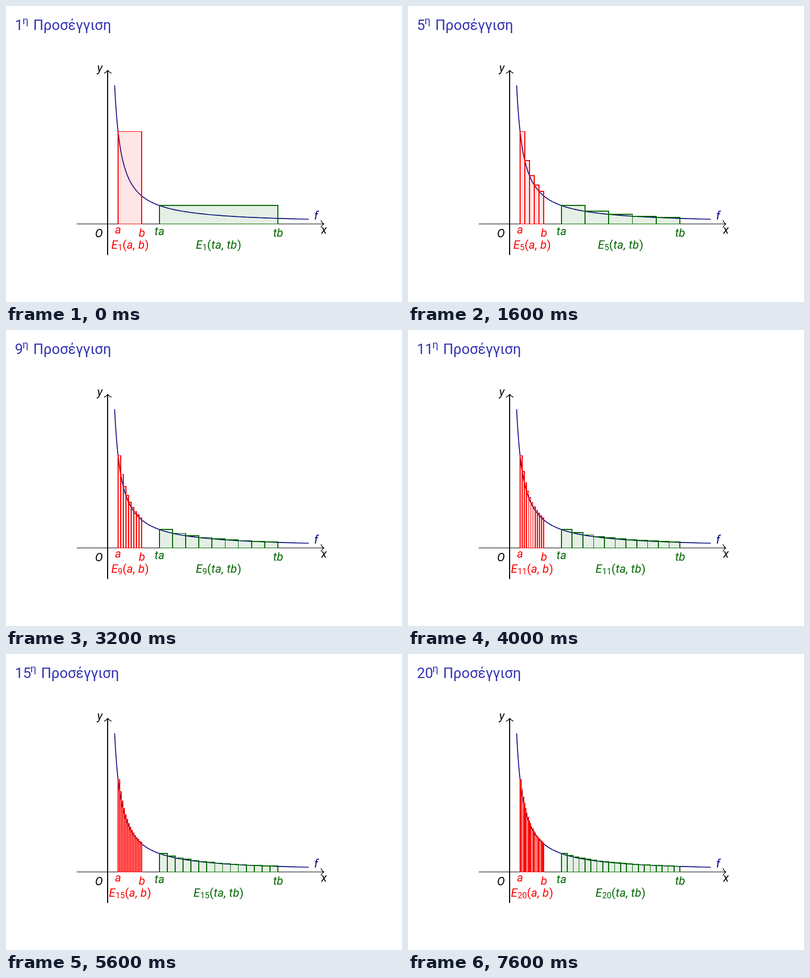
Write an HTML page that moves like this. It is 756x567 px and loops after 8000 ms.

```html
<!DOCTYPE html>
<html lang="el">
<head>
<meta charset="utf-8">
<style>
  html, body { margin: 0; width: 100%; height: 100%; overflow: hidden; background: #fff; }
  svg { display: block; }
  text { font-family: Roboto, "Open Sans", sans-serif; font-weight: 400; }
  .math { font-size: 22.3px; font-style: italic; text-anchor: middle; }
  .area { letter-spacing: .4px; }
  .sub { font-size: 15.8px; font-style: normal; letter-spacing: 0; }
  .up { font-style: normal; }
  .title { font-size: 27.5px; fill: #3333b3; }
  .order { font-size: 20px; }
  .line { fill: none; stroke-width: 1.66; }
  .head { stroke-width: 1.33; stroke-linecap: round; stroke-linejoin: round; }
</style>
</head>
<body>
<svg id="stage" width="756" height="567" viewBox="0 0 756 567"></svg>
<script>
const STEP = 400, COUNT = 20;
const UNIT = 59.06, OX = 194.26, OY = 417.57, HALF = 0.83;
const A = 1 / 3, B = 1.1, T = 5;
const RED = '#ff0000', GREEN = '#006600', NAVY = '#000080', BLACK = '#000';

const stage = document.getElementById('stage');
const px = x => OX + x * UNIT;
const py = y => OY - y * UNIT;

function add(parent, tag, attrs, text) {
  const el = document.createElementNS('http://www.w3.org/2000/svg', tag);
  for (const key in attrs) el.setAttribute(key, attrs[key]);
  if (text) el.textContent = text;
  return parent.appendChild(el);
}

// Lines snap to whole pixels, so they come out one or two pixels wide.
const lo = v => Math.round(v - HALF);
const hi = v => Math.round(v + HALF);
const box = (l, t, r, b) => `M${l} ${t}H${r}V${b}H${l}Z`;
const hLine = (x1, x2, y) => box(lo(x1), lo(y), hi(x2), hi(y));
const vLine = (x, y1, y2) => box(lo(x), lo(y1), hi(x), hi(y2));

function addBars(parent, from, to, n, color) {
  const w = (to - from) / n;
  let fill = '', edges = '';
  for (let i = 0; i < n; i++) {
    const x = from + i * w;
    const l = px(x), r = px(x + w), t = py(1 / x);
    fill += box(Math.round(l), Math.round(t), Math.round(r), Math.round(OY));
    edges += hLine(l, r, t) + hLine(l, r, OY) + vLine(l, t, OY) + vLine(r, t, OY);
  }
  add(parent, 'path', { d: fill, fill: color, 'fill-opacity': 0.1 });
  add(parent, 'path', { d: edges, fill: color });
}

function addArea(parent, n, x, args, color) {
  const text = add(parent, 'text', { x, y: 464.5, fill: color, class: 'math area' });
  add(text, 'tspan', {}, 'E');
  add(text, 'tspan', { dy: 3.5, class: 'sub' }, String(n));
  add(text, 'tspan', { dy: -3.5, class: 'up' }, '(');
  add(text, 'tspan', {}, args[0]);
  add(text, 'tspan', {}, ',');
  add(text, 'tspan', { dx: 5 }, args[1]);
  add(text, 'tspan', { class: 'up' }, ')');
}

function addTitle(parent, n) {
  const shift = 15 * String(n).length;
  add(parent, 'text', { x: 17, y: 46, class: 'title' }, String(n));
  add(parent, 'text', { x: 16.5 + shift, y: 35, class: 'title order' }, 'η');
  add(parent, 'text', { x: 37 + shift, y: 46, class: 'title' }, 'Προσέγγιση');
}

function addLabel(text, x, y, color) {
  add(stage, 'text', { x, y, fill: color, class: 'math' }, text);
}

function addHead(x, y, angle) {
  add(stage, 'path', {
    d: 'M-5.4 -6.6C-5 -4.1 -1.1 -.4 0 0C-1.1 .4 -5 4.1 -5.4 6.6',
    transform: `translate(${x} ${y}) rotate(${angle})`, stroke: BLACK, class: 'line head'
  });
}

add(stage, 'path', { d: box(135, 417, 607, 418) + box(193, 123, 195, 477), fill: BLACK });
addHead(606.9, OY, 0);
addHead(OX, 123.1, -90);

let curve = '';
for (let i = 0; i <= 120; i++) {
  const x = (2 / 9) * Math.pow(6.5 * 4.5, i / 120);
  curve += `${i ? 'L' : 'M'}${px(x).toFixed(2)} ${py(1 / x).toFixed(2)}`;
}
add(stage, 'path', { d: curve, stroke: NAVY, class: 'line' });

const steps = Array.from({ length: COUNT }, (_, i) => {
  const n = i + 1, group = add(stage, 'g', { display: 'none' });
  addTitle(group, n);
  addBars(group, A, B, n, RED);
  addBars(group, T * A, T * B, n, GREEN);
  addArea(group, n, 237, ['a', 'b'], RED);
  addArea(group, n, 406, ['ta', 'tb'], GREEN);
  return group;
});

addLabel('y', 179, 126, BLACK);
addLabel('x', 607, 436, BLACK);
addLabel('O', 177.5, 442.5, BLACK);
addLabel('f', 592, 408.5, NAVY);
addLabel('a', 214, 435.5, RED);
addLabel('b', 259.5, 441.5, RED);
addLabel('ta', 293, 439, GREEN);
addLabel('tb', 519.5, 441.5, GREEN);

let shown = -1;
function show(i) {
  if (i === shown) return;
  if (shown >= 0) steps[shown].setAttribute('display', 'none');
  steps[i].removeAttribute('display');
  shown = i;
}

const start = performance.now();
function tick() {
  show(Math.floor((performance.now() - start) / STEP) % COUNT);
  requestAnimationFrame(tick);
}
show(0);
requestAnimationFrame(tick);
</script>
</body>
</html>
```
